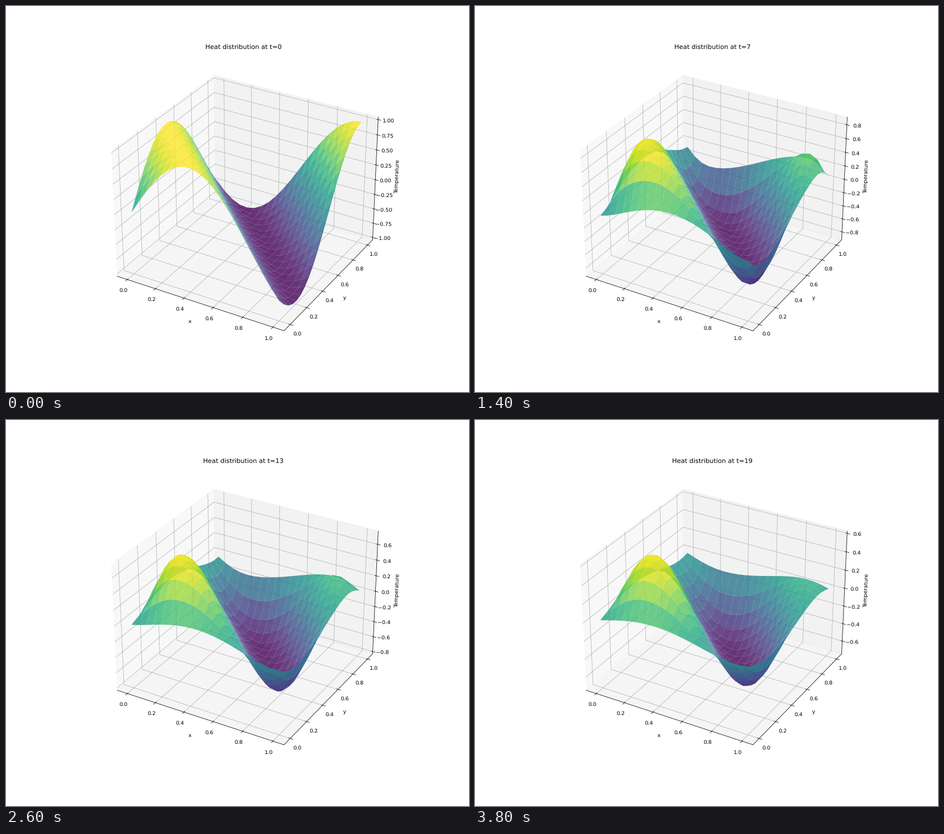
A matplotlib script for the animation above (4 s loop, 820 by 683 pixels).

```python
import numpy as np
import matplotlib.pyplot as plt
from matplotlib.animation import FuncAnimation

plt.rcParams["text.hinting"] = "none"

N = 20          # grid points per side
STEPS = 20
R = 0.2         # diffusion number per time step


def diffuse(u):
    """One explicit heat step with wrap-around borders."""
    around = sum(np.roll(u, s, axis) for axis in (0, 1) for s in (1, -1))
    return u + R * (around - 4 * u)


x, y = np.meshgrid(np.linspace(0, 1, N), np.linspace(0, 1, N))
states = [np.sin(1.25 * np.pi * (x + y))]
while len(states) < STEPS:
    states.append(diffuse(states[-1]))

# 820 x 683 pixels
fig = plt.figure(figsize=(12, 9.9952), dpi=68.3334)
ax = fig.add_subplot(projection="3d")


def draw(i):
    ax.clear()
    ax.plot_surface(x, y, states[i], cmap="viridis", alpha=0.8)
    ax.set_title(f"Heat distribution at t={i}")
    ax.set_xlabel("x")
    ax.set_ylabel("y")
    ax.set_zlabel("Temperature")
    return []


anim = FuncAnimation(fig, draw, frames=STEPS, init_func=lambda: draw(0),
                     interval=200, repeat=True, repeat_delay=0)
plt.show()
```
